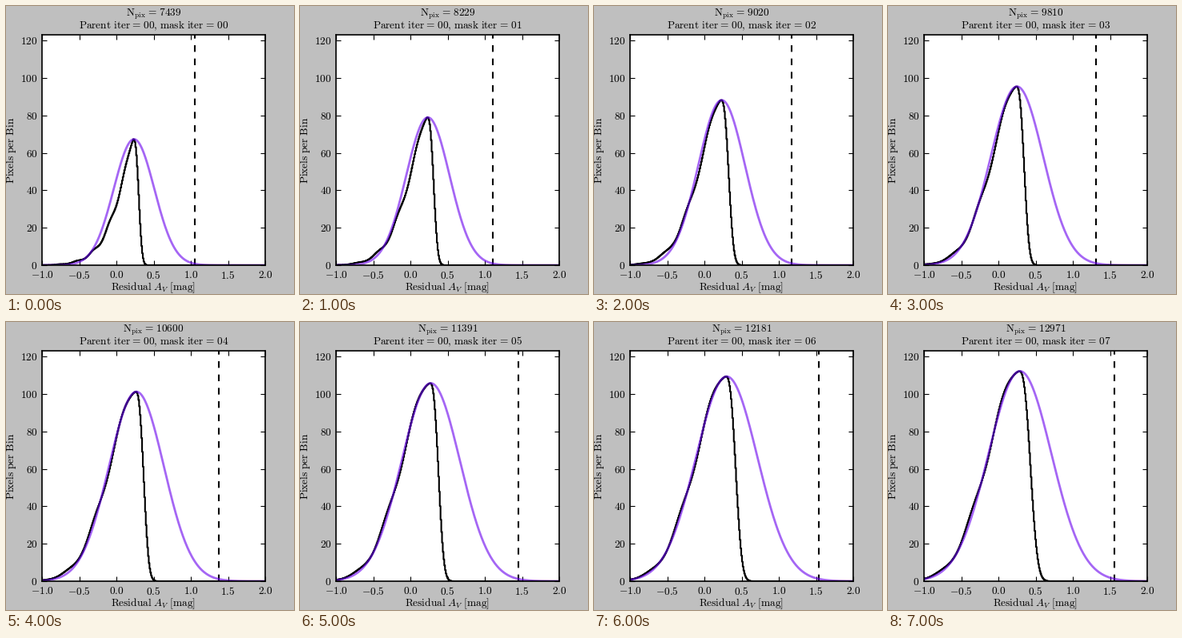
A matplotlib script for the animation above (8 s loop, 360 by 360 pixels).

```python
import numpy as np
import matplotlib.pyplot as plt
from matplotlib.animation import FuncAnimation

SIZE, DPI = 360, 100
STEPS = 8
FONT = 9.6
plt.rcParams["mathtext.fontset"] = "cm"

# One value per mask iteration
MEAN = [.237, .235, .232, .25, .269, .274, .3, .29]
CUT = [1.054, 1.11, 1.172, 1.31, 1.376, 1.452, 1.538, 1.559]
DROP = [.075, .09, .108, .11, .112, .118, .137, .158]


def height(i):
    return 67.3 + 55.6 * (1 - 0.79 ** i)


def gaussian(x, i):
    sigma = (CUT[i] - MEAN[i]) / 3
    return height(i) * np.exp(-0.5 * ((x - MEAN[i]) / sigma) ** 2)


def histogram(x, i):
    """Slightly rippled left flank that turns Gaussian, with a steep right edge."""
    offset = x - 0.97 * MEAN[i]
    width = 0.298 + 0.4 * (1 - 0.82 ** i)
    power = 2 - 0.68 * 0.7 ** i
    v = np.maximum(-offset, 0) / width
    ripple = 0.05 * v * np.cos(2 * np.pi * (v - 1.85) / 0.75)
    u = np.maximum(offset, 0) / DROP[i]
    return height(i) * np.exp(ripple - v ** power) * 0.5 ** (u ** 2.6)


fig = plt.figure(figsize=(SIZE / DPI, SIZE / DPI), dpi=DPI, facecolor="0.75")
ax = fig.add_axes([0.125, 0.1, 0.775, 0.8], facecolor="white")
ax.set(xlim=(-1, 2), ylim=(0, 123.1))

xticks = np.arange(-1, 2.1, 0.5)
yticks = range(0, 121, 20)
ax.set_xticks(xticks, [f"${v:.1f}$" for v in xticks])
ax.set_yticks(yticks, [f"${v}$" for v in yticks])
ax.tick_params(direction="in", top=True, right=True, length=4, width=0.8,
               labelsize=FONT)
ax.tick_params(axis="x", pad=4.4)
ax.tick_params(axis="y", pad=4)
for spine in ax.spines.values():
    spine.set_linewidth(1.2)


def label(x, y, text="", **kw):
    """Centred text with its baseline at a pixel position from the top left."""
    return fig.text(x / SIZE, 1 - y / SIZE, text, size=FONT, ha="center",
                    va="baseline", rotation_mode="anchor", **kw)


EQ = r"\hspace{0.1}=\hspace{0.1}"
count = label(184.5, 13)
title = label(184.5, 28)
label(184.5, 355, r"$\mathrm{Residual}\ A_V\ \mathrm{[mag]}$")
label(10, 180, r"$\mathrm{Pixels\ per\ Bin}$", rotation=90)

bins = np.arange(-1, 2.005, 0.01)
grid = np.linspace(-1, 2, 400)
cut = ax.axvline(CUT[0], color="k", lw=1.5, ls=(0, (4, 4)))
hist, = ax.plot(bins, 0 * bins, color="k", lw=1.5, drawstyle="steps-mid",
                snap=False)
fit, = ax.plot(grid, 0 * grid, color="#6900ee", alpha=0.6, lw=2)


def update(i):
    hist.set_ydata(histogram(bins, i))
    fit.set_ydata(gaussian(grid, i))
    cut.set_xdata([CUT[i], CUT[i]])
    n = round(7439 + 790.35 * i)
    count.set_text(r"$\mathrm{N_{pix}}" + EQ + rf"\mathrm{{{n}}}$")
    title.set_text(r"$\mathrm{Parent\ iter}" + EQ
                   + r"\mathrm{00,}\hspace{0.1}\mathrm{mask\ iter}" + EQ
                   + rf"\mathrm{{{i:02d}}}$")
    return hist, fit, cut, count, title


anim = FuncAnimation(fig, update, frames=STEPS, interval=1000, repeat=True)
plt.show()
```
